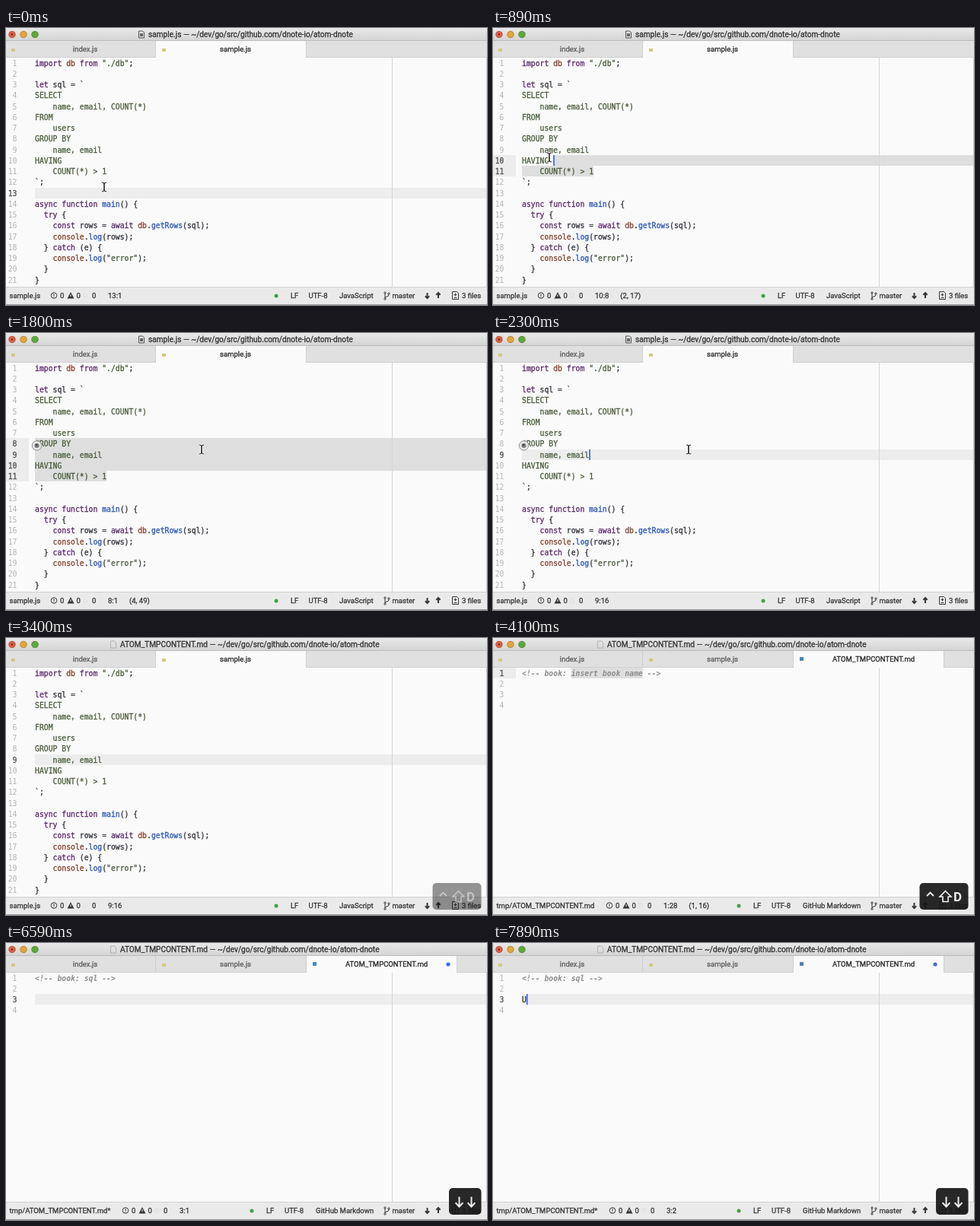
An HTML page with a canvas for the animation above (7.99 s loop, 632 by 364 pixels).

```html
<!DOCTYPE html>
<html lang="en">
<head>
<meta charset="utf-8">
<title>Editor session</title>
<style>
html, body { margin: 0; width: 100%; height: 100%; overflow: hidden; background: #fafafa; }
canvas { display: block; width: 632px; height: 364px; }
</style>
</head>
<body>
<canvas id="stage" width="632" height="364"></canvas>
<script>
const ctx = document.getElementById('stage').getContext('2d');
const LOOP = 7990, STEP = 100;
const LEFT = 38, TOP = 39, CHAR = 5.88, ROW = 14.25, EDGE = 631;
const MONO = '9.77px "DejaVu Sans Mono", monospace';
const UI = 'Roboto, Inter, sans-serif';
const PATH = ' — ~/dev/go/src/github.com/dnote-io/atom-dnote';
const INK = '#33353c', GREEN = '#4d5e40', PURPLE = '#5b2c6c', BLUE = '#2c57b8', BROWN = '#84422f';

const SAMPLE = [
  'import db from "./db";', '', 'let sql = `', 'SELECT',
  '    name, email, COUNT(*)', 'FROM', '    users', 'GROUP BY',
  '    name, email', 'HAVING ', '    COUNT(*) > 1', '`;', '',
  'async function main() {', '  try {',
  '    const rows = await db.getRows(sql);', '    console.log(rows);',
  '  } catch (e) {', '    console.log("error");', '  }', '}'
];
const TOKEN = /("[^"]*"|`)|\b(import|from|let|async|function|try|const|await|catch)\b|\b(main|getRows|log)\b|\b(db|console)\b|[^"`\w]+|\w+/g;
const COLORS = [GREEN, PURPLE, BLUE, BROWN];

// Pointer path: time, x, y
const POINTER = [
  [0, 129, 209], [300, 133, 190], [500, 133, 189], [900, 74, 170], [1000, 66, 163],
  [1300, 40, 148], [1500, 40, 148], [1800, 257, 153], [2400, 257, 153], [2800, 257, 158]
];

const lerp = (a, b, k) => a + (b - a) * k;
const rowTop = r => Math.floor(TOP + r * ROW);
const colX = c => LEFT + c * CHAR;

function pointerAt(t) {
  const i = POINTER.findIndex(p => p[0] > t);
  if (i < 0) return POINTER[POINTER.length - 1].slice(1);
  const a = POINTER[i - 1], b = POINTER[i];
  const k = (t - a[0]) / (b[0] - a[0]);
  return [lerp(a[1], b[1], k), lerp(a[2], b[2], k)];
}

function rect(x, y, w, h, color) {
  ctx.fillStyle = color;
  ctx.fillRect(x, y, w, h);
}

// A hairline outline gives the heavier smoothing of the desktop text.
function text(s, x, y, color, font, align = 'left', weight = .3) {
  ctx.font = font;
  ctx.fillStyle = ctx.strokeStyle = color;
  ctx.textAlign = align;
  ctx.lineWidth = weight;
  ctx.fillText(s, x, y);
  if (weight) ctx.strokeText(s, x, y);
}

function disc(x, y, r, color) {
  ctx.fillStyle = color;
  ctx.beginPath();
  ctx.arc(x, y, r, 0, Math.PI * 2);
  ctx.fill();
}

function stroke(points, color, width, close) {
  ctx.strokeStyle = color;
  ctx.lineWidth = width;
  ctx.beginPath();
  points.forEach(([x, y]) => ctx.lineTo(x, y));
  if (close) ctx.closePath();
  ctx.stroke();
}

function ring(x, y, r, color, width) {
  ctx.strokeStyle = color;
  ctx.lineWidth = width;
  ctx.beginPath();
  ctx.arc(x, y, r, 0, Math.PI * 2);
  ctx.stroke();
}

function page(x, y, w, h, color) {
  stroke([[x, y], [x + w - 2, y], [x + w, y + 2], [x + w, y + h], [x, y + h]], color, 1, true);
}

function arrow(x, y, dir, size, color, width) {
  stroke([[x, y - dir * size], [x, y + dir * size]], color, width);
  stroke([[x - size * .75, y + dir * size * .2], [x, y + dir * size], [x + size * .75, y + dir * size * .2]], color, width);
}

function titleBar(md) {
  const g = ctx.createLinearGradient(0, 0, 0, 17);
  g.addColorStop(0, '#e9e9e9');
  g.addColorStop(1, '#d3d3d3');
  rect(0, 0, 632, 17, g);
  rect(0, 16, 632, 1, '#bcbcbc');
  ['#e0604a', '#e3a43c', '#5aaa3c'].forEach((c, i) => {
    disc(8 + 15 * i, 8.5, 4.6, c);
    ring(8 + 15 * i, 8.5, 4.3, 'rgba(80,50,20,.4)', .7);
  });
  disc(8, 8.5, 1.3, '#7c2419');
  if (md) page(137.5, 4, 7, 9, '#b4b4b4');
  else {
    page(174.5, 4, 7, 9, '#555');
    rect(176, 7, 4, 4, '#666');
  }
  text((md ? 'ATOM_TMPCONTENT.md' : 'sample.js') + PATH, md ? 150 : 187, 12, '#333', '10.12px ' + UI);
}

function tabs(md, dirty) {
  const font = '9.5px ' + UI, active = md ? 395 : 197;
  rect(0, 17, 632, 22, '#e0e0e0');
  rect(0, 38, 632, 1, '#cfcfcf');
  rect(active, 17, 197, 22, '#fafafa');
  [196, 394].concat(md ? [592] : []).forEach(x => rect(x, 17, 1, 22, '#cfcfcf'));
  text('index.js', 104, 31, '#5c5c5c', font, 'center');
  text('sample.js', 301.5, 31, md ? '#5c5c5c' : '#282828', font, 'center');
  rect(7, 27, 5, 4, '#d3c981');
  rect(205, 27, 5, 4, '#d3c981');
  if (!md) return;
  text('ATOM_TMPCONTENT.md', 500, 31, '#282828', font, 'center');
  rect(403, 25, 5, 5, '#5087b5');
  if (dirty) disc(581, 28, 2.6, '#3c6fe0');
}

function statusBar(s) {
  const font = '9.5px ' + UI, c = '#383838';
  const put = (str, x) => text(str, x, 355, c, font);
  rect(0, 340, 632, 24, '#eaeaea');
  rect(0, 340, 632, 1, '#d2d2d2');
  rect(0, 363, 632, 1, '#9c9c9c');
  const off = s.md ? (s.dirty ? 94 : 90) : 0;
  put(s.md ? 'tmp/ATOM_TMPCONTENT.md' + (s.dirty ? '*' : '') : 'sample.js', 4.5);
  ring(63 + off, 351.5, 3.8, c, 1);
  rect(62.5 + off, 349.3, 1, 2.8, c);
  rect(62.5 + off, 352.8, 1, 1, c);
  put('0', 71 + off);
  ctx.fillStyle = c;
  ctx.beginPath();
  ctx.moveTo(85 + off, 347);
  ctx.lineTo(89.5 + off, 355.5);
  ctx.lineTo(80.5 + off, 355.5);
  ctx.fill();
  rect(84.5 + off, 350, 1, 3, '#eaeaea');
  put('0', 92.5 + off);
  ring(104 + off, 351.5, 2.5, '#e0e0e0', 1);
  put('0', 113 + off);
  const pos = (s.row + 1) + ':' + (s.col + 1);
  put(pos, 134 + off);
  if (s.count) put(`(${s.count[0]}, ${s.count[1]})`, 134 + off + ctx.measureText(pos).width + 15);

  disc(s.md ? 323 : 355, 352, 2.5, '#43a047');
  put('LF', s.md ? 342 : 374);
  put('UTF-8', s.md ? 366 : 397.5);
  put(s.md ? 'GitHub Markdown' : 'JavaScript', s.md ? 407 : 438);
  stroke([[498, 349], [498, 355]], c, 1);
  stroke([[503, 350], [502.5, 352], [498, 354]], c, 1);
  [[498, 348], [503, 349], [498, 356]].forEach(p => ring(p[0], p[1], 1.2, c, .9));
  put('master', 507.5);
  arrow(553.5, 351.5, 1, 3.5, c, 2);
  arrow(568, 351.5, -1, 3.5, c, 2);
  page(586.5, 346.5, 8, 10, c);
  stroke([[588.5, 350.5], [592.5, 350.5]], c, 1);
  stroke([[590.5, 348.5], [590.5, 352.5]], c, 1);
  stroke([[588.5, 354.5], [592.5, 354.5]], c, 1);
  put('3 files', 599);
}

function codeLine(line, r) {
  const y = rowTop(r) + 10.6;
  if (r > 2 && r < 11) return text(line, LEFT, y, GREEN, MONO);
  for (const m of line.matchAll(TOKEN)) {
    const group = m.slice(1).findIndex(Boolean);
    text(m[0], colX(m.index), y, COLORS[group] || INK, MONO);
  }
}

function editor(s) {
  rect(0, 39, 632, 301, '#fafafa');
  const sel = s.sel;
  const lit = r => sel ? r >= sel.r0 && r <= sel.r1 : r === s.row;
  const height = r => rowTop(r + 1) - rowTop(r);
  if (sel) {
    for (let r = sel.r0; r <= sel.r1; r++) {
      const x = r === sel.r0 ? colX(sel.c0) : LEFT;
      const end = r === sel.r1 ? colX(sel.c1) : EDGE;
      rect(0, rowTop(r), LEFT - 8, height(r), '#ececec');
      rect(x, rowTop(r), end - x, height(r), '#dedede');
    }
  } else rect(LEFT, rowTop(s.row), EDGE - LEFT, height(s.row), '#ededed');
  rect(507, 39, 1, 301, '#d6d6d6');
  rect(631, 17, 1, 323, '#c8c8c8');
  s.lines.forEach((line, r) => {
    const y = rowTop(r) + 10.6;
    text(r + 1, 14.5, y, lit(r) ? '#555' : '#b4b4b4', MONO, 'right', lit(r) ? .3 : 0);
    if (!s.md) codeLine(line, r);
    else if (r) text(line, LEFT, y, INK, MONO);
    else text(line, LEFT, y, '#8e8e90', 'italic bold ' + MONO, 'left', 0);
  });
  if (s.caret) rect(colX(s.col), rowTop(s.row), 1.7, height(s.row), '#3a66e8');
}

function beam(x, y) {
  for (const [color, w] of [['#fff', 3], ['#222', 1.1]]) {
    for (const d of [-1, 1]) {
      stroke([[x + 3 * d, y - 6], [x + d, y - 5.5], [x, y - 4], [x, y + 4], [x + d, y + 5.5], [x + 3 * d, y + 6]], color, w);
    }
  }
}

function clickMark() {
  disc(40.5, 148, 6.5, '#e6e6e6');
  ring(40.5, 148, 6.2, '#999', 1);
  disc(40.5, 148, 3, '#777');
  rect(39, 146, 2, 2, '#444');
}

function keys(kind, alpha) {
  const x = kind === 'combo' ? 560.5 : kind === 'two' ? 582 : 602;
  ctx.globalAlpha = alpha;
  ctx.fillStyle = '#161616';
  ctx.beginPath();
  ctx.roundRect(x, 322, 624.5 - x, 35, 5);
  ctx.fill();
  if (kind === 'combo') {
    stroke([[570, 339], [574.5, 334.5], [579, 339]], '#fff', 1.8);
    stroke([[594.5, 332.5], [602, 340], [598, 340], [598, 346.5], [591, 346.5], [591, 340], [587, 340]], '#fff', 1.6, true);
    text('D', 605, 346, '#fff', 'bold 17px ' + UI, 'left', 0);
  } else {
    if (kind === 'two') arrow(595.5, 340, 1, 6.5, '#fff', 2);
    arrow(611.5, 340, 1, 6.5, '#fff', 2);
  }
  ctx.globalAlpha = 1;
}

function sampleState(t) {
  const s = { md: false, lines: SAMPLE, row: 12, col: 0, caret: t < 300 && t > 0 };
  if (t >= 2200) {
    s.row = 8;
    s.col = 15;
    s.caret = Math.floor((t - 2200) / 400) % 2 === 0;
  } else if (t >= 400) {
    // The selection trails the pointer by one tick.
    const [x, y] = pointerAt(Math.min(t - STEP, 1400));
    s.row = Math.floor((y - TOP) / ROW);
    s.col = Math.max(0, Math.min(SAMPLE[s.row].length, Math.round((x - LEFT) / CHAR)));
    s.caret = t < 1800;
    if (s.row < 10 || s.col < 16) {
      s.sel = { r0: s.row, c0: s.col, r1: 10, c1: 16 };
      const part = SAMPLE.slice(s.row, 11).join('\n').slice(s.col);
      s.count = [11 - s.row, part.length];
    }
  }
  return s;
}

function noteState(t) {
  const s = { md: true, dirty: t >= 5100, row: 0, col: 14 };
  let book = 'sql', typed = '';
  if (t < 4500) {
    book = 'insert book name';
    s.col = 27;
    s.sel = { r0: 0, c0: 11, r1: 0, c1: 27 };
    s.count = [1, 16];
    s.caret = t < 4100;
  } else if (t < 6200) {
    book = 'sql'.slice(0, t < 4700 ? 1 : t < 4800 ? 2 : 3);
    s.col = 11 + book.length;
    s.caret = t < 5100 || (t >= 5500 && t < 5900);
  } else {
    s.row = t < 6400 ? 1 : 2;
    s.col = 0;
    s.caret = t < 6600 || (t >= 7100 && t < 7400) || t >= 7800;
    if (t >= 7900) {
      typed = 'U';
      s.col = 1;
    }
  }
  s.lines = [`<!-- book: ${book} -->`, '', typed, ''];
  return s;
}

function draw(time) {
  const t = Math.floor((time + 10) / STEP) * STEP;
  const s = t < 3500 ? sampleState(t) : noteState(t);
  ctx.clearRect(0, 0, 632, 364);
  editor(s);
  titleBar(t >= 3400);
  tabs(s.md, s.dirty);
  statusBar(s);
  if (t >= 1500 && t < 2400) clickMark();
  if (t < 3400) beam(...pointerAt(t));
  if (t >= 6200) keys(t < 6400 ? 'one' : 'two', .92);
  else if (t >= 3300) keys('combo', Math.min(.92, .2 + (t - 3300) / 400));
}

function tick(now) {
  draw(now % LOOP);
  requestAnimationFrame(tick);
}
requestAnimationFrame(tick);
</script>
</body>
</html>
```
